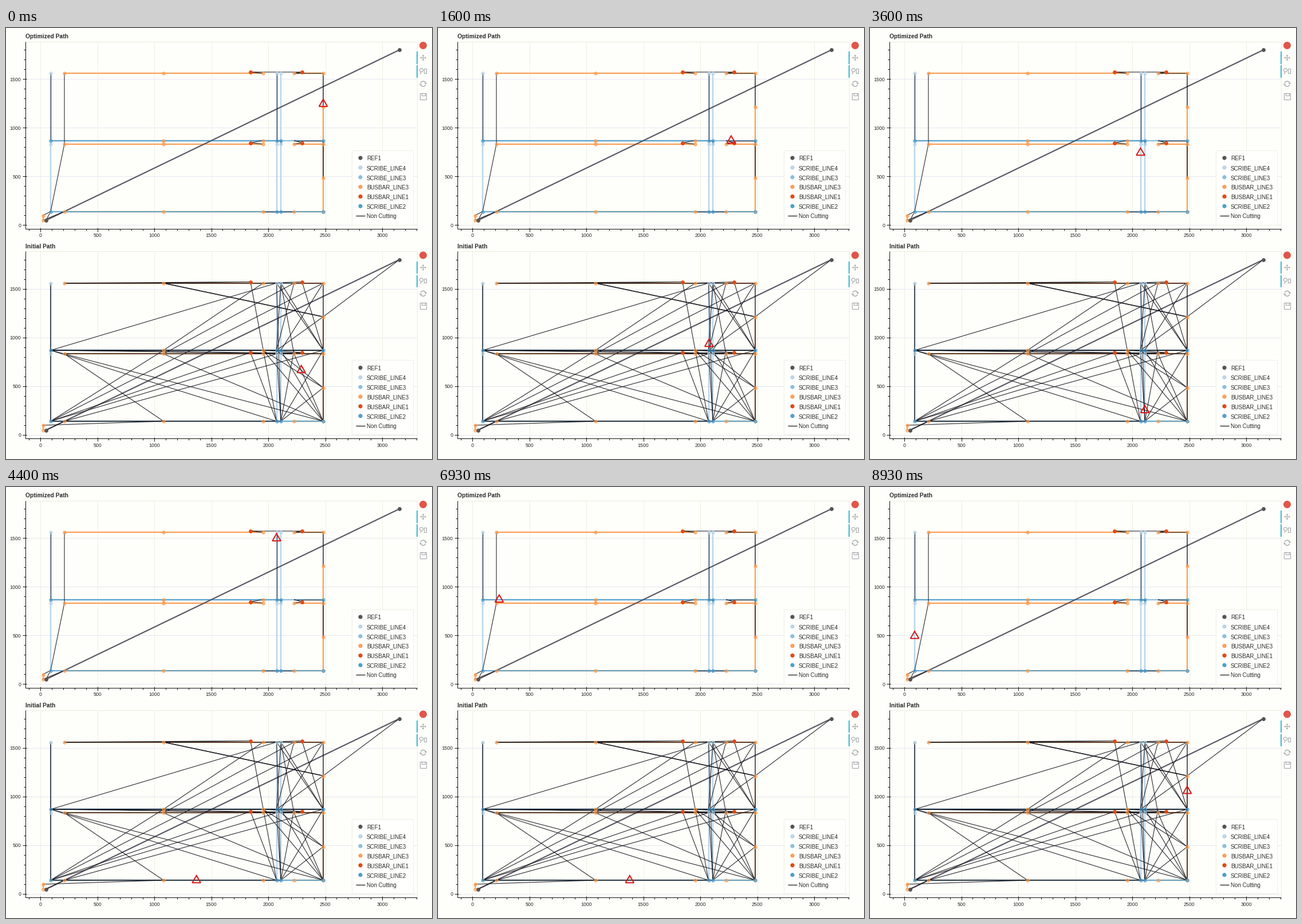
These frames come from a looping animation (744 px wide and 753 px high, 9 s). A matplotlib script:

```python
import numpy as np
import matplotlib.pyplot as plt
from matplotlib.animation import FuncAnimation
from matplotlib.collections import LineCollection
from matplotlib.colors import to_rgba
from matplotlib.patches import Arc, Circle, FancyArrow, Polygon, Rectangle

W, H, DPI = 744, 753, 96
PX = 72 / DPI              # points per pixel
FRAMES, TICK = 225, 40     # 9 s loop
STEP = 9000 / 135          # ms between two positions of the heads
SHIFT = 366.5              # vertical distance between the panels
SPEED = np.array([14.05, 10.68])   # pixels per step along x and y

plt.rcParams["font.family"] = "Liberation Sans"
fig = plt.figure(figsize=(W / DPI, H / DPI), dpi=DPI, facecolor="#fefefa")
ax = fig.add_axes([0, 0, 1, 1])
ax.set_xlim(0, W)
ax.set_ylim(H, 0)
ax.axis("off")

GREY, PALE, SKY = "#555555", "#bad5e8", "#8abfde"
ORANGE, RED, BLUE = "#fb9f55", "#e04a14", "#509fce"
ICON = "#a5a8ab"
LEGEND = [("REF1", GREY), ("SCRIBE_LINE4", PALE), ("SCRIBE_LINE3", SKY),
          ("BUSBAR_LINE3", ORANGE), ("BUSBAR_LINE1", RED),
          ("SCRIBE_LINE2", BLUE)]

# A node is named by a column letter and a row character.
COLS = dict(a=78, b=102, c=275, d=427, e=449, f=472.5, g=480, h=503,
            i=517, j=554, k=64.5, l=70, m=687)
ROWS = {"0": 77, "1": 79.2, "2": 138, "3": 196.6, "4": 200.5, "5": 202.8,
        "6": 262, "7": 320.5, "8": 327.5, "9": 336, "t": 38.3}


def nodes(text):
    return np.array([(COLS[n[0]], ROWS[n[1]]) for n in text.split()])


def draw_lines(segs, color, width, z, alpha=1.0):
    ax.add_collection(LineCollection(segs, colors=color, linewidths=width * PX,
                                     zorder=z, alpha=alpha), autolim=False)


def draw_paths(text, color, width, dy, z, alpha=1.0):
    segs = [nodes(part) + (0, dy) for part in text.split(",")]
    draw_lines(segs, color, width, z, alpha)


def draw_dots(text, color, dy, size=5.2, fill=0.6):
    pts = nodes(text) + (0, dy)
    ax.scatter(pts[:, 0], pts[:, 1], s=(size * PX) ** 2,
               facecolors=[to_rgba(color, fill)], edgecolors=color,
               linewidths=PX, zorder=5)


def add(patch):
    patch.set_zorder(8)
    ax.add_patch(patch)


def label(x, y, text, size, ha="left", weight="normal"):
    ax.text(x, y, text, fontsize=size * PX, color="#2b2b2b", ha=ha,
            va="center_baseline", weight=weight, zorder=9)


def data_x(v):
    return 60 + 0.199 * v


def data_y(v):
    return 344.4 - 0.17 * v


def draw_axes(title, dy):
    left, right, top, bottom = 33.5, 717.5, 23.5 + dy, 350.5 + dy
    label(34, 14 + dy, title, 10.2, weight="bold")
    xs, ys = range(0, 3001, 500), range(0, 1501, 500)
    draw_lines([[(data_x(v), top), (data_x(v), bottom)] for v in xs],
               "#f0f0e2", 1, 1)
    draw_lines([[(left, data_y(v) + dy), (right, data_y(v) + dy)] for v in ys],
               "#e6e6f4", 1, 1)
    ax.add_patch(Rectangle((left, top), right - left, bottom - top, fill=False,
                           ec="#ececdf", lw=PX, zorder=1))
    ticks = [[(left, top), (left, bottom)], [(left, bottom), (right, bottom)]]
    for v in range(-100, 3301, 100):
        big = v % 500 == 0
        ticks.append([(data_x(v), bottom - 2 * big),
                      (data_x(v), bottom + 3 + 2 * big)])
    for v in range(0, 1801, 100):
        big = v % 500 == 0
        y = data_y(v) + dy
        ticks.append([(left + 2 * big, y), (left - 3 - 2 * big, y)])
    draw_lines(ticks, "#111111", 1, 2)
    for v in xs:
        label(data_x(v), 361.5 + dy, str(v), 8.8, ha="center")
    for v in ys:
        label(26, data_y(v) + dy, str(v), 8.8, ha="right")


def draw_legend(dy):
    ax.add_patch(Rectangle((603.5, 213.5 + dy), 107, 130, fc="#fffffd",
                           ec="#f0f0e6", lw=PX, zorder=7))
    for n, (name, color) in enumerate(LEGEND + [("Non Cutting", None)]):
        y = 227 + 16.85 * n + dy
        label(630, y, name, 9.9)
        if color:
            add(Circle((619, y), 3.6, color=color, lw=0))
        else:
            draw_lines([[(611, y), (627, y)]], "#111111", 1.2, 8)


def draw_toolbar(dy):
    x = 728.5
    add(Circle((x, 30.5 + dy), 6.5, color="#e0564a", lw=0))
    for y in (41, 65):
        add(Rectangle((717, y + dy), 2, 21.5, color="#3fb6d6", lw=0))
    for s in (-5.5, 5.5):
        for step in ((s, 0), (0, s)):
            add(FancyArrow(x, 52 + dy, *step, width=1, head_width=4,
                           head_length=2.5, length_includes_head=True,
                           color=ICON, lw=0))
    outline = dict(fill=False, ec=ICON, lw=1.1 * PX)
    add(Circle((725.5, 73.5 + dy), 3, **outline))
    draw_lines([[(725, 77 + dy), (723.5, 80.5 + dy)]], ICON, 1.2, 8)
    add(Rectangle((730, 71 + dy), 4, 7.5, **outline))
    y = 97.5 + dy
    for s in (-1, 1):
        start = 110 + 90 * s
        add(Arc((x, y), 9, 9, theta1=start, theta2=start + 140, ec=ICON,
                lw=1.4 * PX))
        add(Polygon([(x + s * 2.2, y), (x + s * 6.6, y),
                     (x + s * 4.6, y - s * 3)], color=ICON, lw=0))
    add(Rectangle((723, 113.5 + dy), 11, 11, **outline))
    add(Rectangle((725.5, 113.5 + dy), 6, 4, **outline))


def draw_cuts(dy):
    draw_paths("l9 mt", "#57535f", 2.1, dy, 4)
    draw_paths("a1 a7,f1 f7,g1 g7", PALE, 2.4, dy, 3)
    for row in "157":
        draw_paths(f"b{row} e{row},h{row} j{row}", ORANGE, 2.2, dy, 3)
    draw_paths("j2 j7,c3 c5,k8 k9", ORANGE, 2.2, dy, 3)
    draw_paths("a3 j3", SKY, 2.2, dy, 3)
    draw_paths("a3 f3,a7 j7", BLUE, 2.2, dy, 3, 0.85)
    draw_dots("a1 f1 g1 a5 f5 g5", PALE, dy)
    for row in "157":
        draw_dots(" ".join(c + row for c in "bcehj"), ORANGE, dy)
    draw_dots("j2 j6 c3 e3 k8 k9", ORANGE, dy)
    for row in "37":
        draw_dots(" ".join(c + row for c in "afgj"), BLUE, dy)
    draw_dots("d0 i0 d4 i4", RED, dy, 5.8, 1)
    draw_dots("l9 mt", GREY, dy, 5.8, 1)


# Non-cutting moves of the two panels
SHORT = ("k8 a7,k9 b7,l9 a7 b5 b1,a1 a3,e1 d0 i0 h1 j1,h3 j3,e3 d4 e5,"
         "h3 i4 h5,f1 f3,f3 g3 g5,e7 f7 g7 h7")
LONG = ("k8 c7,l9 b7,b1 d0 c1 j2,a3 f1,a3 d4,a3 f7,a3 j7,a3 e3,b5 c7,c5 j7,"
        "a7 c3 e1,c5 h1,a7 j1,a7 d4,a7 f5,b7 j3,c3 j3,b3 h5,"
        "mt j2,e1 i0,d0 f7,e3 j6,e3 j7,d4 f7,f1 j3,g1 j3,g1 h5,i0 j3,"
        "h1 f3,j1 g3,j2 f3,j6 f3,g7 j3,g7 j6,g7 h3,g3 j7,h5 j7,"
        "f3 g1,f1 g7,g7 f3,d4 i4,e3 i4,d4 h5")
BOLD_SHORT = "j1 j2,j3 j6"
BOLD_LONG = "a1 a3,a3 a7,b1 e1,e1 j1,j1 j7,a3 j3,b5 j5,a7 g7,c1 j2"

for dy, title in ((0, "Optimized Path"), (SHIFT, "Initial Path")):
    draw_axes(title, dy)
    draw_cuts(dy)
    draw_legend(dy)
    draw_toolbar(dy)
for dy, thin, bold in ((0, SHORT, BOLD_SHORT), (SHIFT, LONG, BOLD_LONG)):
    draw_paths(thin, "#101018", 1.1, dy, 4, 0.9)
    draw_paths(bold, "#101018", 1.5, dy, 4, 0.9)

TRIANGLE = np.array([(-7.3, 4.4), (7.3, 4.4), (0, -8.2)])


class Head:
    """Triangle that follows a route of nodes at a steady pace."""

    def __init__(self, route, done, pace, dy):
        self.pts = nodes(route) + (0, dy)
        legs = np.diff(self.pts, axis=0) / (SPEED * pace)
        spans = np.hypot(legs[:, 0], legs[:, 1])
        # "done" is the share of the first leg already behind at the start
        self.times = np.append(0, np.cumsum(spans)) - done * spans[0]
        self.shape = Polygon(TRIANGLE, closed=True, fill=False, ec="#d81818",
                             lw=2 * PX, joinstyle="miter", zorder=10)
        ax.add_patch(self.shape)

    def move(self, step):
        x, y = (np.interp(step, self.times, axis) for axis in self.pts.T)
        self.shape.set_xy(TRIANGLE + (x, y))


heads = [Head("j1 j2 j6 j5 h5 i4 h3 j3 g3 g7 f7 f1 f3 a3 a1 a7", 0.91, 1, 0),
         Head("f3 j6 j2 f3 g1 g7 a7 l9 b7 e7 g7 f3 j3 j1", 0.53, 1.025, SHIFT)]


def update(n):
    step = round(n * TICK / STEP)
    for head in heads:
        head.move(step)
    return [head.shape for head in heads]


anim = FuncAnimation(fig, update, frames=FRAMES, interval=TICK,
                     init_func=lambda: update(0), repeat=True, repeat_delay=0,
                     blit=False)
plt.show()
```
